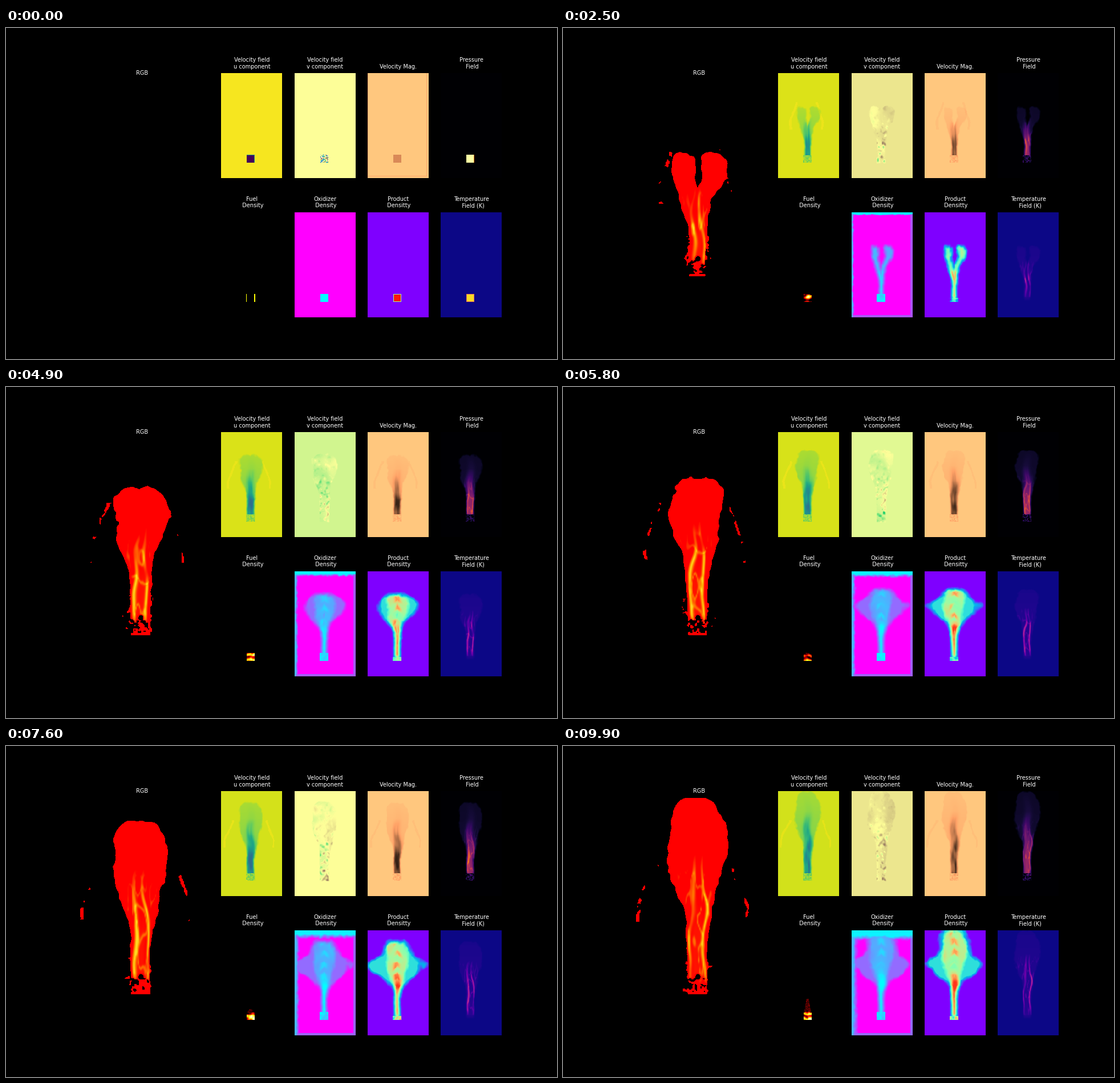
Write a matplotlib script that moves like this. It is 966 px wide and 580 px high and loops after 10000 ms.

```python
import numpy as np
import matplotlib.pyplot as plt
from matplotlib.animation import FuncAnimation
from matplotlib.colors import LinearSegmentedColormap

W, H, DPI = 966, 580, 100
FRAMES, STEP = 100, 100
NX, NY = 118, 202
ASPECT = 1.718

# Lengths are pixels of the large panel, measured from the burner's base.
rng = np.random.default_rng(7)
rows, cols = np.mgrid[0:NY, 0:NX]
X = cols * 2 + 1 - 114.5
Y = 343.5 - (rows * 2 + 1)
SQUARE = (abs(X) < 15) & (Y > 0) & (Y < 30)


def texture(sy, sx):
    """Periodic blurred noise with unit deviation."""
    fy = np.fft.fftfreq(256)[:, None]
    fx = np.fft.fftfreq(NX)[None, :]
    blur = np.exp(-2 * np.pi**2 * ((fy * sy) ** 2 + (fx * sx) ** 2))
    n = np.fft.ifft2(np.fft.fft2(rng.standard_normal((256, NX))) * blur).real
    return n / n.std()


FINE, MID = texture(0.7, 0.7), texture(2.2, 1.8)
COARSE, LONG = texture(9, 6), texture(7, 1.6)


def scroll(tex, i, speed):
    return np.roll(tex, -int(i * speed), axis=0)[:NY]


def key(t, *points):
    return np.interp(t, *zip(*points))


def ramp(x, a, b):
    return np.clip((x - a) / (b - a), 0, 1)


def bell(x, w):
    return np.exp(-((x / w) ** 2))


def ignition():
    rim = SQUARE & ((X > 12.5) | (Y > 27.5))
    edge = rim | SQUARE & ((X < -12.5) | (Y < 2))
    line = (cols == 114) & (rows < 199) | (rows == 198) & (cols < 115) | (cols == 0)

    def paint(bg, fill, border=None, where=edge):
        square = np.where(SQUARE, fill, bg)
        return square if border is None else np.where(where, border, square)

    specks = 0.5 + 0.3 * FINE[:NY] * (abs(FINE[:NY]) > 0.6)
    bars = (abs(abs(X) - 15.5) < 1.3) & (Y > 0) & (Y < 30)
    return [
        np.full((NY, NX), -1.0),
        paint(0.985, 0.01, 0.5, rim),
        paint(0.497, np.clip(specks, 0.1, 0.95)),
        np.where(line, 0.84, paint(1.0, 0.69)),
        paint(0.0, 1.0, 0.7, SQUARE & (X > 12.5)),
        np.where(bars, 0.75, 0.0),
        paint(1.0, 0.0),
        paint(0.0, 0.97, 0.55),
        paint(0.0, 0.93, 0.65),
    ]


def outline(t, top, sway, grow=0.0):
    """Distance inside a plume of two arms that part and merge again."""
    head_h = top * (0.9 - 0.017 * t)
    stem = key(t, (0, 8), (1.1, 9), (2.5, 15), (4.9, 17))
    head = key(t, (0, 9), (1.1, 14), (2.5, 22), (4.9, 30), (9.9, 45))
    part = key(t, (0, 7), (1.1, 13), (2.5, 27), (4.9, 15), (9.9, 5))
    low, high = key(t, (1.1, 0), (2.5, 55)), key(t, (1.1, 25), (2.5, 170))
    swell = bell(np.minimum(Y - head_h, 0), 0.24 * top)
    cap = np.sqrt(1 - ramp(Y, head_h, top) ** 3)
    half = (stem + (head - stem) * swell + grow) * cap
    arm = part * ramp(Y, low, high) ** 2
    d = half - np.minimum(abs(X - sway - arm), abs(X - sway + arm))
    return np.minimum(d, top - Y)


def fields(i):
    if i == 0:
        return ignition()
    t = i / 10
    fine, mid = scroll(FINE, i, 2.3), scroll(MID, i, 3)
    coarse, long = scroll(COARSE, i, 2.5), scroll(LONG, i, 3)
    top = key(t, (0, 31), (1.1, 85), (2.5, 217), (4.9, 259), (9.9, 345))
    hc = top * key(t, (1.1, 1), (2.5, 0.66), (9.9, 0.64))
    rise = ramp(Y / top, 0, 1)

    # flame, wider gas cloud, and their ragged edges
    sway = ramp(Y, 20, 180) * 3 * np.sin(Y / 20 - 3.1 * t)
    rough = 0.5 + 2 * ramp(Y, 40, 200)
    ragged = rough * (0.6 * mid + 0.7 * coarse)
    d = np.minimum(outline(t, top, sway) + ragged, Y + 1)
    wing = 60 * ramp(t, 2.5, 6) * bell(Y - 207, np.where(Y > 207, 34, 52))
    halo = 14 * ramp(t, 3, 8) * ramp(Y, 110, 230)
    dw = outline(t, top * (1.03 + 0.05 * ramp(t, 8, 9.9)), sway, wing + halo)
    dw = np.minimum(dw + ragged + wing / 10 * coarse, Y + 1)
    inside = ramp(d, -1, 7)
    burner = (Y > 0) & (Y < 28) & (abs(X) < 16)

    # faint arcs drifting outwards on both sides
    far = (0.6 + 0.4 * ramp(t, 2.3, 7)) * (105 - 35 * ramp(Y, 155, 225))
    arc = bell(np.where(X < 0, -X, X / 0.85) - far + 2 * coarse, 4)
    arc = arc * (Y > 125) * (Y < 232) * (t > 2.2)

    # hot core and its two bright sheets
    c = 1.3 * sway
    split = key(t, (1.1, 13), (2.5, 3))
    cw = key(t, (1.1, 5), (2.5, 9), (4.9, 11))
    core = np.maximum(bell(X - c - split, cw), bell(X - c + split, cw))
    fade = ramp(Y, 8, 30) * (1 - ramp(Y, 0.5 * hc, 1.2 * hc))
    reach = ramp(Y, 14, 36) * (1 - ramp(Y, 0.75 * hc, 1.15 * hc))
    off = key(t, (1.1, 13), (2.5, 8), (9.9, 13.5)) * (1 - 0.5 * ramp(Y, 0.6 * hc, hc))
    sheet = bell(abs(X - c + 2.5 * coarse) - off, 2.8)
    sheet = sheet * reach * np.clip(0.75 + 0.25 * long, 0, 1)
    ridge = bell(long + 0.5 * coarse, 0.3) * reach * ramp(d, 2, 7)

    # fire
    solid = d.copy()
    if t > 0.5:
        solid[burner & (Y > 4) & (fine + 0.5 * mid < 0)] = -2
    if t > 2:
        solid = np.minimum(solid, np.hypot(X - 1, Y - 30) - 5)
    skirt = (Y > 4) & (Y < 70) & (abs(X) > 14) & (t > 2.4)
    skirt = skirt & (0.7 * mid + 0.6 * fine > (abs(X) - 14) / 9)
    wisp = (arc > 0.4) & (mid + 0.4 * fine > 0.3)
    fire = np.clip(0.2 + 0.1 * solid, -0.4, 0.35)
    fire = np.where(skirt | wisp, 0.35, fire)
    fire = fire + (solid > 0) * (0.6 * sheet + 0.25 * ridge + 0.12 * core * fade)
    fire = np.minimum(fire, 1.0)
    if t > 9.3:
        fire[(sheet > 0.6) & (fine > 1.6) & (Y > 45) & (Y < 115)] = 1.6

    # flow
    jet = core * fade * np.clip(0.85 + 0.2 * long, 0.4, 1.1)
    speed = inside * (0.24 * (1 - 0.6 * rise) + 0.12 * core * (1 - rise) + 0.55 * jet)
    speed = np.where(burner, 0.16 + 0.06 * fine, speed) * (Y > 0)
    u = 0.952 - 0.002 * t - 0.66 * speed + 0.025 * (arc > 0.3)
    mag = 1 - np.maximum(speed - 0.04, 0) ** 1.1 - 0.04 * (arc > 0.3)

    low = 1 - ramp(Y, 0.5 * hc, 1.1 * hc)
    drift = 0.02 * np.tanh(X / 25) + 0.015 * coarse
    eddy = np.sign(mid) * np.maximum(abs(mid) - 0.7, 0) * (0.015 + 0.07 * low)
    v = key(t, (1.1, 0.497), (2.5, 0.538), (4.9, 0.457), (6.7, 0.485), (9.9, 0.537))
    v = np.clip(v + ramp(d, -3, 2) * (drift * ramp(t, 0.8, 2) + eddy), 0.05, 0.95)

    press = 0.1 * (1 - 0.3 * rise) + 0.12 * core * (1 - rise)
    press = inside * (press + fade * (0.22 * core + 0.28 * sheet + 0.14 * ridge))
    press = np.where(burner, np.maximum(0.08 + 0.07 * fine, 0), press) * (Y > 0)

    # species
    bed_h = key(t, (0, 30), (1.1, 42), (2.5, 29))
    cone_h = key(t, (7, 30), (9.9, 80))
    bed = (abs(X) < 15) & (Y > 0) & (Y < bed_h + 2 * coarse)
    cone = (abs(X) < 14 - 9 * ramp(Y, 25, cone_h)) & (Y > 0) & (Y < cone_h)
    layers = 0.45 + 0.25 * np.sin(Y / 3.5 + 4 * t + 1.5 * coarse) + 0.15 * mid
    fuel = np.where(bed, np.clip(layers, 0, 0.95), cone * np.clip(0.1 + 0.04 * fine, 0, 1))

    band = np.clip(0.5 + 0.7 * np.sin(Y / 7 - 3 * t + abs(X) / 9) + 0.5 * coarse, 0, 1)
    cloud, body = ramp(dw, -1, 22), ramp(d, -1, 14)
    patchy = ramp(Y, 0.65 * hc, 0.9 * hc) * (1 - 0.75 * band * (1 - 0.4 * rise))
    hot = core * cloud * ramp(Y, 8, 24) * (1 - patchy)
    prod = 0.34 * cloud + 0.24 * body + 0.4 * hot + 0.03 * coarse * body
    prod = np.where(burner & (Y < 14), 0.45 + 0.12 * mid, prod)
    prod = np.clip(prod, 0, 0.93) * (Y > -1)

    ox = 1 - 0.42 * ramp(dw, -1, 16) - 0.26 * body - 0.32 * hot + 0.03 * coarse * body
    ox = np.where((abs(X) < 16) & (Y > 0) & (Y < 30), 0.12 + 0.06 * mid, ox)
    near_l, near_r = cols * 2, 2 * (NX - 1 - cols)
    near_t, near_b = rows * 2, 2 * (NY - 1 - rows)
    rag = 1.5 * mid * ramp(t, 1, 3)
    rim = ((near_r < 8) | (near_b < 8)) * ramp(t, 0, 0.6) * (0.3 + 0.012 * t)
    inflow_l = 0.8 * np.clip(1.2 * (1 - (near_l + rag) / (2 + 2.2 * t)), 0, 0.9)
    inflow_t = np.clip(1.9 * (1 - (near_t + rag) / (0.5 + 3.9 * t)), 0, 0.95)
    ox = np.minimum(ox, 1 - np.maximum.reduce([rim, inflow_l, inflow_t]))

    temp = inside * (0.045 * (1 - 0.6 * rise) + 0.36 * sheet + 0.1 * ridge)
    temp = temp * ramp(Y, 2, 20)
    return [fire, u, v, mag, press, fuel, np.clip(ox, 0, 1), prod, temp]


flame = LinearSegmentedColormap.from_list("flame", [
    (0, "#ff0000"), (0.28, "#ff0000"), (0.5, "#ff5000"),
    (0.8, "#ffa500"), (1, "#ffe028")])
flame.set_under("black")
flame.set_over("#6a3cff")
hot_map = plt.get_cmap("hot").copy()
hot_map.set_under("black")

PANELS = [
    ("RGB", flame),
    ("Velocity field\nu component", "viridis"),
    ("Velocity field\nv component", "terrain"),
    ("Velocity Mag.", "copper"),
    ("Pressure\n Field", "inferno"),
    ("Fuel\n Density", hot_map),
    ("Oxidizer\n Density", "cool"),
    ("Product\n Densitty", "rainbow"),
    ("Temperature\n  Field (K)", "plasma"),
]

fig = plt.figure(figsize=(W / DPI, H / DPI), dpi=DPI, facecolor="black")
grid = fig.add_gridspec(2, 6, left=0.125, right=0.9, bottom=0.11, top=0.88,
                        wspace=0.2, hspace=0.2)
slots = [grid[:, :2]] + [grid[r, c] for r in range(2) for c in range(2, 6)]
images = []
for (title, cmap), slot, data in zip(PANELS, slots, fields(0)):
    ax = fig.add_subplot(slot)
    ax.axis("off")
    ax.set_box_aspect(ASPECT)
    ax.set_title(title, fontsize=7, color="white")
    big = cmap is flame
    vmin = 0.2 if big else 0.005 if cmap is hot_map else 0
    images.append(ax.imshow(
        data, cmap=cmap, vmin=vmin, vmax=1.02 if big else 1,
        aspect="auto", interpolation="bilinear" if big else "nearest"))


def draw(i):
    for image, data in zip(images, fields(i)):
        image.set_data(data)
    return images


anim = FuncAnimation(fig, draw, frames=FRAMES, interval=STEP, repeat=True, repeat_delay=0)
plt.show()
```
